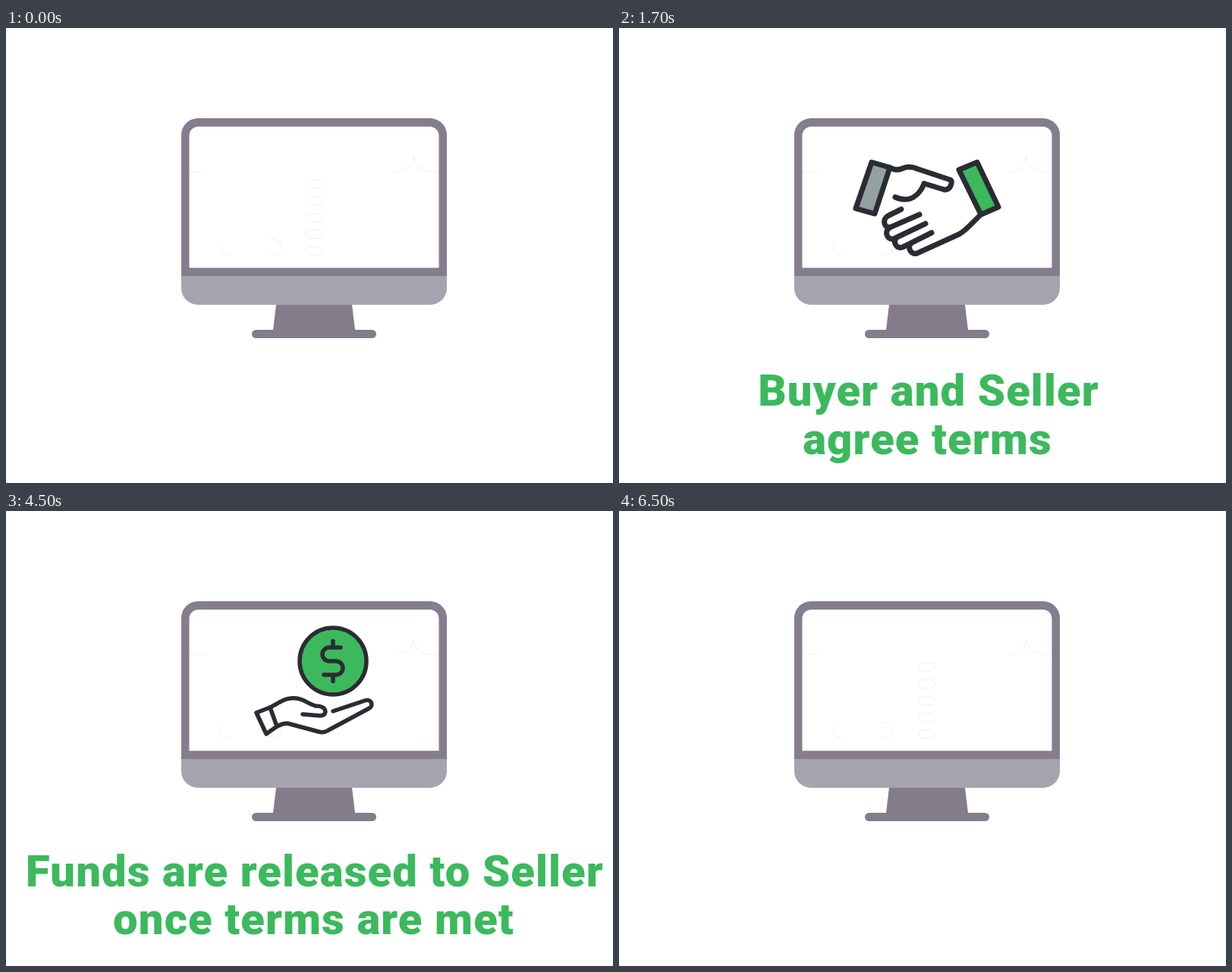
Write an HTML page that moves like this. It is 800 px wide and 600 px high and loops after 7500 ms.

```html
<!DOCTYPE html>
<html lang="en">
<head>
<meta charset="utf-8">
<title>How escrow works</title>
<style>
  html, body { margin: 0; width: 100%; height: 100%; overflow: hidden; background: #fff; }
  svg { display: block; width: 100vw; height: 100vh; }
  text { font: 900 58px Roboto, "Open Sans", sans-serif; letter-spacing: 1.1px; text-anchor: middle; fill: #3cb95d; }
  .brand { fill: #043b57; }
  .ink { fill: none; stroke: #2b2c33; stroke-width: 5.5; stroke-linecap: round; stroke-linejoin: round; }
  .ink .green { fill: #3cb95d; }
  .ink .grey { fill: #93a2a1; }
  .ink .white { fill: #fff; stroke: none; }
  .bold { stroke-width: 7; }
  .faint { fill: none; stroke: #000; stroke-opacity: .06; }
  .scene { display: none; }
</style>
</head>
<body>
<svg viewBox="0 0 800 600">
  <defs>
    <path id="dollar" d="M10-18H-5a9 9 0 0 0 0 18H4a9 9 0 0 1 0 18H-12M0-26.5V-18M0 18V26.5"/>
  </defs>

  <!-- computer -->
  <path fill="#857d8d" d="M231 327V141a22 22 0 0 1 22-22H559a22 22 0 0 1 22 22V327Z"/>
  <path fill="#a5a3ae" d="M231 327H581V343a22 22 0 0 1-22 22H253a22 22 0 0 1-22-22Z"/>
  <path fill="#fff" d="M241.500 316.300V142a12 12 0 0 1 12-12H558.500a12 12 0 0 1 12 12V316.300Z"/>
  <path fill="#847c8b" d="M356 365H456L460 398H352Z"/>
  <rect fill="#847c8b" x="324" y="398" width="164" height="11" rx="5.500"/>

  <g class="faint">
    <path d="M242 189.500H254Q260 189 265 187M513 189.500A24 20 0 0 0 537 169.500A24 20 0 0 0 561 189.500H570"/>
    <path d="M286 280a11 11 0 0 0 0 17q6 4 12 0M346 280q6-4 12 0a11 11 0 0 1 0 17q-6 4-12 0"/>
    <g id="slots"></g>
  </g>

  <g class="scene">
    <g class="ink bold">
      <path class="white" d="M357 184L394 186 437 200 430 213 402 205 378 226 364 223 350 252 364 284 390 298 448 272 476 247 448 187 345 220Z"/>
      <path class="grey" d="M333 177L357 184 337 245 312 238Z"/>
      <path class="green" d="M448 187L472 177 500 236 477 246Z"/>
      <path d="M357 184C362 187 368 188 374 185C381 182 387 183 394 186L436 200Q439 201 438 205C437 211 433 214 428 213L402 205C398 217 388 226 378 226Q370 226 364 223"/>
      <path d="M372 239L354 248C347 252 349 264 357 263L396 246"/>
      <path d="M357 263C349 268 353 280 362 278L404 258"/>
      <path d="M365 277C361 283 366 292 374 289L412 270"/>
      <path d="M384 285C380 291 386 300 393 297L448 272C458 267 466 256 476 247"/>
    </g>
    <text x="408" y="498">Buyer and Seller</text>
    <text x="406.500" y="562">agree terms</text>
  </g>

  <g class="scene">
    <g class="ink">
      <path d="M368 169H334.700q-4 0-4 4V265.500q0 4 4 4H477.300q4 0 4-4V173q0-4-4-4H444M406 270V297M374 297H438"/>
      <path d="M386 185V171a20 20 0 0 1 40 0V185"/>
      <rect class="green" x="377" y="185" width="57.500" height="41.500" rx="4"/>
      <use href="#dollar" class="bold" transform="translate(406 206) scale(.37)"/>
    </g>
    <text x="407" y="495">Buyer’s funds are held</text>
    <text x="406" y="558">in trust by <tspan class="brand">Zelvadon</tspan></text>
  </g>

  <g class="scene">
    <g class="ink">
      <circle class="green" cx="431" cy="198" r="44"/>
      <use href="#dollar" transform="translate(431 198)"/>
      <path class="white" d="M330 266L348 259C358 254 365 248 375 247C389 245 397 254 408 257L421 265 431 264 473 250 479 260 425 289 412 291 371 280 343 294Z"/>
      <path d="M330 266L348 259 357 284 343 294Z"/>
      <path d="M348 259C358 254 365 248 375 247C389 245 397 254 408 257C416 257 421 260 421 265Q420 270 414 270L391 268"/>
      <path d="M431 264L473 250C481 247 485 256 479 260L425 289Q419 293 412 291L371 280Q364 280 357 284"/>
    </g>
    <text x="407" y="495">Funds are released to Seller</text>
    <text x="405.500" y="558">once terms are met</text>
  </g>
</svg>
<script>
  const LOOP = 7500, START = 500, STEP = 2000;
  const scenes = [...document.querySelectorAll('.scene')];
  const holder = document.getElementById('slots');

  // faint slots down the middle of the screen
  for (let i = 0; i < 5; i++) {
    holder.innerHTML += `<rect x="395.5" y="${200.5 + i * 22}" width="21" height="11" rx="5.5"/>`;
  }
  const slots = [...holder.children];
  const slotsShown = [[1, 2], [2], []];

  const show = (el, on) => { el.style.display = on ? 'inline' : 'none'; };

  function draw(ms) {
    const now = Math.floor(((ms % LOOP) - START) / STEP);
    const shown = slotsShown[now];
    scenes.forEach((s, i) => show(s, i === now));
    slots.forEach((s, i) => show(s, !shown || shown.includes(i)));
  }

  const t0 = performance.now();
  function tick() {
    draw(performance.now() - t0);
    requestAnimationFrame(tick);
  }
  tick();
</script>
</body>
</html>
```
